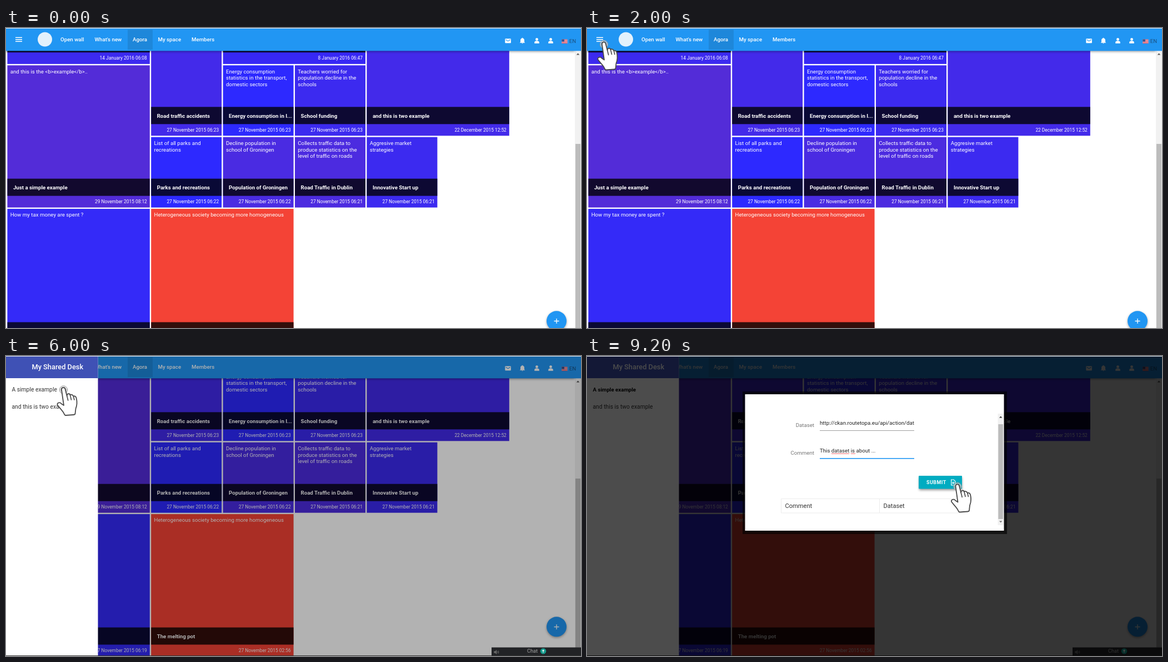
Animation of 1035x541 px, one loop 10000 ms. Source, as an HTML page:

```html
<!DOCTYPE html>
<html lang="en">
<head>
<meta charset="utf-8">
<title>Open data tiles</title>
<style>
  html, body { margin: 0; width: 100%; height: 100%; overflow: hidden; background: #fff; }
  svg { display: block; width: 1035px; height: 541px; font: 9.7px Roboto, Arial, sans-serif; }
  .medium { font-weight: 500; }
  .bold { font-weight: 700; }
  .date { font-size: 8.4px; }
  .end { text-anchor: end; }
  .item { font-size: 10.3px; fill: #333; }
  .cell { font-size: 11.1px; fill: #333; }

  /* Every change is a hard cut on a ten second loop. */
  .cut { animation: 10s step-end infinite; }
  .menu-click { animation-name: menu-click; }
  .drawer { animation-name: drawer; }
  .item-click { animation-name: item-click; }
  .dialog { animation-name: dialog; }
  .before-dialog { animation-name: before-dialog; }
  .shift { animation-name: shift; }
  @keyframes menu-click { 0%, 40%, 100% { visibility: hidden } 20% { visibility: visible } }
  @keyframes drawer { 0% { visibility: hidden } 40%, 100% { visibility: visible } }
  @keyframes item-click { 0%, 80%, 100% { visibility: hidden } 60% { visibility: visible } }
  @keyframes dialog { 0% { visibility: hidden } 80%, 100% { visibility: visible } }
  @keyframes before-dialog { 0%, 80%, 100% { visibility: hidden } 40% { visibility: visible } }
  @keyframes shift { 0% { transform: none } 40%, 100% { transform: translateY(var(--by)) } }
</style>
</head>
<body>
<svg viewBox="0 0 1035 541">
  <defs>
    <filter id="soft" x="-20%" y="-50%" width="140%" height="200%"><feGaussianBlur stdDeviation="2"/></filter>
    <clipPath id="field"><rect x="419" y="110" width="170" height="22"/></clipPath>
    <g id="person" fill="#fff">
      <circle cy="-2.6" r="2.4"/>
      <path d="M-4.3 4.8V3C-4.3 .6-1.5 .3 0 .3S4.3 .6 4.3 3v1.8z"/>
    </g>
    <g id="hand" stroke="#4a4a4a" stroke-linecap="round" stroke-linejoin="round">
      <circle r="7.2" fill="#ddd" fill-opacity=".6" stroke="#999" stroke-width="1"/>
      <circle r="4.7" fill="none" stroke="#aaa" stroke-width="1"/>
      <path fill="#fff" stroke-width="1.8" d="M-3.5 0C-4-5 2-5.5 3-1.5L6.2 11C6 6 11 6 12 9.5C12 8 16.8 8 18 12C18.5 10.5 22 11 23 14.5C24.6 21 24 29 22 34L21 43Q20.5 45 18 45L4 46Q2 46 1 43C-1 38-8 32-11 27C-12 23-6 22-4 25L.5 28Z"/>
      <path fill="none" stroke-width="1.6" d="M6.2 11l2 8M12 9.5l2 8.5M18 12l1.4 6"/>
    </g>
  </defs>

  <g class="cut shift" style="--by:-41px" id="tiles" fill="#fff"></g>

  <rect x="1024" y="40" width="11" height="501" fill="#f1f1f1"/>
  <rect class="cut shift" style="--by:12px" x="1025" y="209" width="9" height="340" fill="#bcbcbc"/>

  <g class="cut shift" style="--by:-1px">
    <path d="M1026.7 48.5l2.8-3 2.8 3z" fill="#505050"/>
    <rect x="-5" y="34" width="1029" height="8.5" fill="#000" opacity=".4" filter="url(#soft)"/>
    <rect y="0" width="1035" height="41.3" fill="#2196f3"/>
    <rect x="219" y="3" width="45" height="36" fill="#000" opacity=".1"/>
    <path d="M17 17.3h12M17 20.8h12M17 24.3h12" stroke="#fff" stroke-width="1.4"/>
    <circle cx="70" cy="20.5" r="13" fill="#e3f1fc"/>
    <g id="nav" class="medium" fill="#fff"></g>
    <rect x="898.3" y="19.3" width="10.6" height="8" rx="1" fill="#fff"/>
    <path d="M899.5 21l4.1 2.7 4.1-2.7" fill="none" stroke="#2196f3" stroke-width="1.1"/>
    <path d="M924.7 26.7l1.3-1.5v-3c0-2 1-3.2 2.6-3.6v-.8h1.8v.8c1.6.4 2.6 1.6 2.6 3.6v3l1.3 1.5zM928.2 27.3h2.6q-1.3 2-2.6 0z" fill="#fff"/>
    <use href="#person" x="955.5" y="23"/>
    <use href="#person" x="980.5" y="23"/>
    <rect x="1000.3" y="20.5" width="10.2" height="7.4" fill="#f1d9dc"/>
    <path d="M1000.3 21.2h10.2M1000.3 23.3h10.2M1000.3 25.4h10.2M1000.3 27.3h10.2" stroke="#d8334a" stroke-width="1"/>
    <rect x="1000.3" y="20.5" width="4.6" height="4" fill="#34508c"/>
    <text x="1013.8" y="26.6" font-size="9.5" fill="#1b4f7d">EN</text>
  </g>

  <g class="cut shift" style="--by:-40px">
    <circle cx="991" cy="530" r="18" fill="#000" opacity=".35" filter="url(#soft)"/>
    <circle cx="991" cy="528.3" r="18" fill="#2196f3"/>
    <path d="M986.5 528.5h9M991 524v9" stroke="#fff" stroke-width="1.3"/>
  </g>

  <g class="cut drawer">
    <rect width="1035" height="541" opacity=".3"/>
    <rect x="874" y="525.5" width="161" height="16" fill="#222326"/>
    <path d="M878.5 532.5h2l2.5-2v7l-2.5-2h-2zM884.5 532q1.3 2 0 4M886 531q2 3 0 6" fill="#666" stroke="#666" stroke-width=".6"/>
    <text x="938" y="535.3" font-size="9.2" fill="#a5a5a5">Chat</text>
    <circle cx="967" cy="532.2" r="5.3" fill="#159a8c"/>
    <path d="M967 535v-4M965.3 532l1.7-2 1.7 2" fill="none" stroke="#fff" stroke-width="1.1"/>
    <rect width="165.5" height="541" fill="#fff"/>
    <rect width="165.5" height="40" fill="#3f51b5"/>
    <text class="medium" x="46.5" y="24" font-size="12.8" fill="#fff">My Shared Desk</text>
    <text class="item" x="10.5" y="95.2">and this is two example</text>
    <rect y="540" width="1035" height="1" fill="#333"/>
  </g>
  <text class="item cut before-dialog" x="10.5" y="64.3">A simple example</text>

  <g class="cut dialog">
    <text class="bold" x="10.5" y="64.3" fill="#000">A simple example</text>
    <rect width="1035" height="541" opacity=".7"/>
    <rect x="280" y="64" width="476" height="257" opacity=".65"/>
    <rect x="284.5" y="69" width="466" height="246" fill="#fff"/>

    <rect x="739.5" y="104" width="10" height="201" fill="#f1f1f1"/>
    <rect x="740.3" y="123" width="8.6" height="171" fill="#bcbcbc"/>
    <path d="M742 111.5l2.7-3 2.7 3z" fill="#333"/>
    <path d="M742 297.5l2.7 3 2.7-3z" fill="#777"/>

    <g class="end" fill="#757575">
      <text x="409" y="128.3">Dataset</text>
      <text x="409" y="178.3">Comment</text>
    </g>
    <g fill="#222">
      <text x="419" y="123.5" clip-path="url(#field)">http://ckan.routetopa.eu/api/action/datastore</text>
      <text x="419" y="173.6">This dataset is about ...</text>
    </g>
    <path id="wavy" fill="none" stroke="#f0414a" stroke-width=".8"/>
    <rect x="419" y="134" width="170" height="1" fill="#9e9e9e"/>
    <rect x="419" y="184" width="170" height="1.6" fill="#2196f3"/>

    <rect x="598" y="219" width="77" height="23" opacity=".4" filter="url(#soft)"/>
    <rect x="597" y="216" width="78" height="23.5" rx="1" fill="#00acc1"/>
    <text class="bold" x="611" y="230.8" font-size="8.9" letter-spacing=".5" fill="#fff">SUBMIT</text>
    <path d="M655.7 223h4.3l2.7 2.7v7.3h-7zM659.2 226.5v4.5M657 228.8h4.4" fill="none" stroke="#fff" stroke-width="1.2"/>

    <path d="M349.5 257.5h325.5v25.5h-325.5zM526.5 257.5v25.5" fill="none" stroke="#ececec"/>
    <text class="cell" x="356.5" y="274.4">Comment</text>
    <text class="cell" x="533.5" y="274.4">Dataset</text>
  </g>

  <use href="#hand" x="30.5" y="29.5" class="cut menu-click"/>
  <use href="#hand" x="103.5" y="61" class="cut item-click"/>
  <use href="#hand" x="667" y="235.5" class="cut dialog"/>
  <rect width="1035" height="1" fill="#e8eef4"/>
</svg>
<script>
  const PITCH = 129.4, GAP = 2.4, TOP = 67.3, FOOT = 21, BAND = 31;
  const byId = id => document.getElementById(id);
  const escapeText = s => s.replace(/&/g, '&amp;').replace(/</g, '&lt;');
  const text = (x, y, s, cls = '') => `<text x="${x}" y="${y}" class="${cls}">${escapeText(s)}</text>`;

  // Columns, rows and spans are in grid units.
  function tile([col, row, cols, rows, color, lines, title, date]) {
    const x = GAP + col * PITCH, y = TOP + row * PITCH;
    const w = cols * PITCH - GAP, h = rows * PITCH - GAP;
    const foot = y + h - FOOT;
    return `<rect x="${x}" y="${y}" width="${w}" height="${h}" fill="${color}"/>` +
      `<rect x="${x}" y="${foot - BAND}" width="${w}" height="${BAND}" fill="#000" opacity=".79"/>` +
      lines.map((line, i) => text(x + 5.3, y + 14.2 + i * 11.7, line)).join('') +
      text(x + 10.5, foot - 11.6, title, 'bold') +
      text(x + w - 5, foot + 13.2, date, 'date end');
  }

  byId('tiles').innerHTML = [
    [0, -2, 2, 2, '#3c2af0', [], '', '14 January 2016 06:08'],
    [3, -2, 2, 2, '#3728f5', [], '', '8 January 2016 06:47'],
    [2, -1, 1, 2, '#432aea', [], 'Road traffic accidents', '27 November 2015 06:23'],
    [5, -1, 2, 2, '#432aea', [], 'and this is two example', '22 December 2015 12:52'],
    [0, 0, 2, 2, '#532cd8', ['and this is the <b>example</b>..'], 'Just a simple example', '29 November 2015 08:12'],
    [3, 0, 1, 1, '#2d29ff', ['Energy consumption', 'statistics in the transport,', 'domestic sectors'], 'Energy consumption in I...', '27 November 2015 06:23'],
    [4, 0, 1, 1, '#3c2af0', ['Teachers worried for', 'population decline in the', 'schools'], 'School funding', '27 November 2015 06:23'],
    [2, 1, 1, 1, '#2d29ff', ['List of all parks and', 'recreations'], 'Parks and recreations', '27 November 2015 06:22'],
    [3, 1, 1, 1, '#4a2be2', ['Decline population in', 'school of Groningen'], 'Population of Groningen', '27 November 2015 06:22'],
    [4, 1, 1, 1, '#4c2be0', ['Collects traffic data to', 'produce statistics on the', 'level of traffic on roads'], 'Road Traffic in Dublin', '27 November 2015 06:21'],
    [5, 1, 1, 1, '#3c2af0', ['Aggresive market', 'strategies'], 'Innovative Start up', '27 November 2015 06:21'],
    [0, 2, 2, 2, '#342af8', ['How my tax money are spent ?'], '', '27 November 2015 06:19'],
    [2, 2, 2, 2, '#f44336', ['Heterogeneous society becoming more homogeneous'], 'The melting pot', '27 November 2015 02:56'],
  ].map(tile).join('');

  byId('nav').innerHTML = [
    [98, 'Open wall'], [159.5, "What's new"], [228, 'Agora'], [273.5, 'My space'], [334, 'Members'],
  ].map(([x, label]) => text(x, 24, label)).join('');

  const wave = (x, steps) => `M${x} 175.5` + 'l1 1.2l1-1.2'.repeat(steps);
  byId('wavy').setAttribute('d', wave(440, 16) + wave(475, 4));
</script>
</body>
</html>
```
